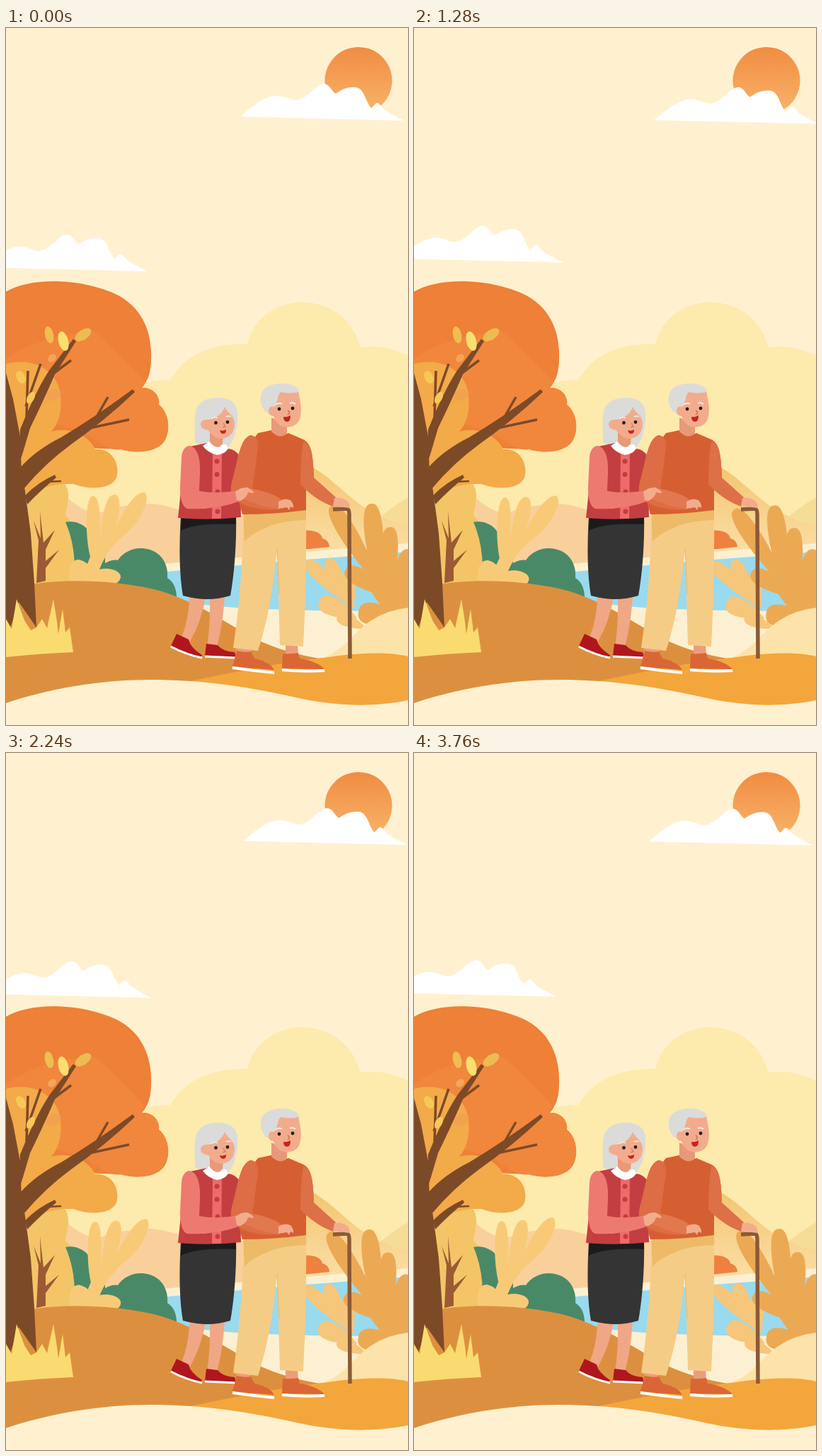
These frames come from a looping animation (568x986 px, 3840 ms). An HTML page:

```html
<!DOCTYPE html>
<html lang="en">
<head>
<meta charset="utf-8">
<title>Autumn walk</title>
<style>
html, body { margin: 0; width: 100%; height: 100%; overflow: hidden; background: #fff1d0; }
svg { display: block; width: 100vw; height: 100vh; }
</style>
</head>
<body>
<svg viewBox="0 0 568 986" preserveAspectRatio="none">
  <defs>
    <linearGradient id="sunFill" x2="0" y2="1">
      <stop offset="0" stop-color="#f18c43"/><stop offset="1" stop-color="#f7b56a"/>
    </linearGradient>
    <linearGradient id="ridge" x2="0" y2="1">
      <stop offset="0" stop-color="#f4c26c"/><stop offset="1" stop-color="#fbdfa6"/>
    </linearGradient>
    <path id="cloud" fill="#fff" d="M330.500 125.500C347 112 364 97 380 96C394 95 401 103 411 102C428 99 437 79 450 79C458 80 460 90 466 93C475 86 485 83 494 84C507 85 508 106 516 113C519 112 521 106 525 106C530 108 531 114 540 119Q550 125 563 131Z"/>
  </defs>

  <rect width="568" height="986" fill="#fff1d0"/>
  <circle cx="498" cy="74.500" r="47.500" fill="url(#sunFill)"/>
  <use href="#cloud" id="cloudA"/>
  <use href="#cloud" id="cloudB"/>

  <!-- distant bushes and hills -->
  <path fill="#fdeaad" d="M30 720V540H150C165 510 195 497 232 498C252 464 285 446 341 447C350 410 382 388 418 388C458 388 490 412 501 452C525 448 548 454 568 463V740H30Z"/>
  <path fill="#f5dd97" d="M515 704Q540 680 568 664V735H515Z"/>
  <path fill="#f9d09c" d="M80 658Q100 680 128 687Q165 673 205 673Q235 675 262 690L420 690V770H80Z"/>
  <path fill="url(#ridge)" d="M415 608L436 623C465 640 490 672 520 686Q545 700 568 704V745H400Z"/>
  <path fill="#ee8140" d="M400 740V720C415 712 424 709 430 711C440 712 446 716 447 722Q456 724 457 734Z"/>
  <path fill="#fdf0d2" d="M220 758L424 741L568 729V900H220Z"/>
  <path fill="#99daee" d="M215 770L424 752L568 741V824Q470 826 368 822Q290 820 215 806Z"/>

  <g id="sprig" fill="#f6c67a"></g>
  <g id="fern" fill="#eca954"></g>
  <path fill="#fce3a9" d="M452 889C480 878 493 852 518 837Q540 823 568 820V900H452Z"/>

  <!-- left side greenery -->
  <path fill="#f3c566" d="M30 655Q62 640 84 646C92 660 86 675 84 690C98 700 104 730 97 790H30Z"/>
  <g fill="#4a8968">
    <path d="M84 699C98 696 112 703 118 713Q120 722 122 725L140 742V795H95Q102 740 84 699Z"/>
    <path d="M120 790C122 765 145 750 158 753C165 742 178 736 190 736C212 736 230 751 228 778C238 784 242 796 241 812H120Z"/>
  </g>
  <path id="bush" fill="#f8ca78" d="M92 792C86 765 91 752 103 752Q111 754 115 758L119 748C111 715 112 662 123 662C134 662 133 700 133 724C135 700 139 660 153 660C166 660 160 700 149 721C160 692 182 653 196 657C205 664 192 697 169 716C150 730 138 750 132 766C146 762 162 768 162 776C161 787 148 790 135 790Z"/>

  <!-- ground -->
  <path fill="#dc903f" d="M0 796Q20 788 42 786C90 779 155 782 205 793C265 807 310 842 352 864Q395 885 450 893V940L260 960H0Z"/>
  <path fill="#f3a63c" d="M250 926C320 912 390 897 455 890C500 884 540 882 568 889V965H250Z"/>
  <path fill="#fff1d0" d="M0 955C60 935 130 922 205 922C285 922 350 934 405 946C465 960 520 961 568 951V986H0Z"/>

  <!-- tree -->
  <path fill="#ee8037" d="M0 373C33 354 95 353 147 373C187 388 207 424 205 468C205 488 200 500 192 509C205 508 218 518 216 533C228 542 233 563 226 580C218 600 186 603 162 596L0 590Z"/>
  <path fill="#f0873c" d="M0 468C40 440 85 435 122 428C140 440 175 475 197 501L192 509C205 508 218 518 216 533C228 542 233 563 226 580C218 600 186 603 162 596C145 600 125 580 105 570L0 540Z"/>
  <path fill="#f3aa49" d="M0 475C35 466 64 481 74 506C81 530 78 555 64 571C90 563 118 577 126 596C148 594 162 615 156 636C150 651 122 655 95 645Q60 644 40 657L0 664Z"/>
  <path fill="#9b5a35" d="M43 785L46 725L39 697L49 722L48 684L53 728L69 710L56 738L56 754L75 738L56 764V782Z"/>
  <g fill="#7d4a27">
    <path d="M0 488L10 525L20 578L22 630L27 655L35 715L40 785L43 848L18 812L5 852L0 845Z"/>
    <path d="M18 618L20 568Q42 513 62 483L95 440L99 443L69 490Q54 525 34 566L24 600Z"/>
    <path d="M20 622Q42 597 78 579Q125 551 179 511L182 515Q140 555 92 589Q55 616 25 652Z"/>
    <path d="M27 661Q45 643 69 632L71 636Q49 654 30 674Z"/>
  </g>
  <g fill="none" stroke="#7d4a27" stroke-width="3.500">
    <path d="M68 488L92 470M128 550L144 522M118 566L174 554M29 550L31 485M28 535L49 475"/>
    <path stroke-width="2.500" d="M58 642L78 641"/>
  </g>
  <g id="leaves"></g>
  <path fill="#fadb70" d="M0 890V836L8 850L15 808L26 838L35 852L43 848L51 836L58 849L67 808L72 840L74 857L80 822L84 855L90 848L95 883Q45 885 0 890Z"/>

  <!-- woman -->
  <g>
    <path fill="#f0a785" d="M259 803L282 806Q275 842 260 868L248 862Q259 835 259 803ZM288 806H309Q306 845 298 876H284Q289 840 288 806Z"/>
    <path fill="#b0161d" d="M241 857L258 865Q260 876 277 887L276 890Q252 886 233 874ZM283 871L299 873Q306 882 323 883L325 890L281 888Z"/>
    <path fill="none" stroke="#fff" stroke-width="3" d="M233 875Q253 886 277 891M281 889L325 891"/>
    <path fill="#343434" d="M247 690H325C326 725 323 770 317 803Q285 813 250 803C244 770 245 725 247 690Z"/>
    <path fill="#1c1b1c" d="M248 690H325V702C290 701 265 702 247 711Z"/>
    <path fill="#dbdbda" d="M267 586C267 570 266 553 268 543C271 529 284 523 299 523C315 523 325 529 327 543C328 560 325 580 314 593H280Z"/>
    <path fill="#c33e40" d="M260 592L284 587L313 595Q325 596 330 606L332 692Q290 697 243 693L247 655Z"/>
    <path fill="#ef6a68" d="M292 600H305L304 694H291Z"/>
    <g fill="#c33e40"><circle cx="298" cy="613" r="3.500"/><circle cx="298" cy="631.500" r="3.500"/><circle cx="299" cy="656" r="3.500"/><circle cx="299" cy="684" r="3.500"/></g>
    <path fill="#fff" d="M278 591L289 584Q300 591 311 589L314 595Q309 603 298 604Q285 601 278 591Z"/>
    <path fill="#e99878" d="M288 570L307 576L306 588Q299 599 288 586Z"/>
    <path fill="#f2ac8c" d="M286 554C297 552 306 546 309 536C313 545 323 548 323 560C323 575 313 581 303 581C294 580 288 573 286 569Q275 568 275 560Q276 553 286 554Z"/>
    <path fill="none" stroke="#eee" stroke-width="1.500" d="M290 553Q295 549 299 552M311 550Q315 548 318 550"/>
    <g fill="#29201e"><circle cx="296.500" cy="558.500" r="2.400"/><circle cx="313" cy="557.500" r="2.400"/></g>
    <path fill="none" stroke="#d9805f" stroke-width="1.500" d="M307 559L310 564L306 565"/>
    <path fill="#c9231f" d="M302 569Q306 571 311 568Q311 574 307 574Q303 574 302 569Z"/>
  </g>

  <!-- man -->
  <g>
    <path fill="#eb9d7b" d="M325 874H347L346 886H326ZM395 872H412L413 888H395Z"/>
    <path fill="#da6635" d="M326 881Q337 884 346 882L351 892Q372 896 379 908L320 903ZM391 885Q402 886 413 884L415 892Q440 896 450 907L390 906Z"/>
    <path fill="none" stroke="#fff" stroke-width="4" d="M320 905Q348 909 379 912M390 908Q420 911 450 909"/>
    <path fill="#f5cc85" d="M336 680H424Q425 780 420 875L387 873L383 735Q376 820 356 881L321 877Q335 780 336 680Z"/>
    <path fill="#edba68" d="M335 680H424V696Q385 697 365 708Q348 715 337 726Z"/>
    <path fill="none" stroke="#e8b768" d="M383 736L386 800"/>
    <path fill="#d65f32" d="M356 573L375 569Q386 580 399 573L420 582C432 588 434 604 435 638L424 645L424 682Q380 688 334 688L326 660C335 620 342 590 356 573Z"/>
    <path fill="#dd7047" d="M420 584C432 588 434 606 435 636L466 664L463 677Q440 670 416 646Q416 610 420 584Z"/>
    <path fill="#dd6d44" d="M345 576C357 576 358 590 354 608L348 652Q373 655 389 667L386 681Q345 684 322 666Q314 656 321 635C329 604 331 582 345 576Z"/>
    <path fill="#e2784f" d="M347 652Q372 656 389 667L386 681Q354 676 334 665Z"/>
    <path fill="#f2ac8c" d="M385 670Q394 664 402 668Q407 674 406 679L402 677L400 682L397 678L385 680Z"/>
    <path fill="#e89977" d="M375 551L397 563V573Q388 583 375 571Z"/>
    <path fill="#dbdbda" d="M360 529C358 511 370 503 390 503C405 503 414 508 415 518Q401 524 391 520Q386 537 380 546Q364 548 360 529Z"/>
    <path fill="#f2ac8c" d="M379 536C385 529 383 517 389 515Q402 518 413 515C417 530 419 548 413 557C405 569 382 567 378 549Q371 549 371 541Q372 534 379 536Z"/>
    <path fill="none" stroke="#eee" stroke-width="1.800" d="M381 533Q385 529 390 532M401 531Q405 529 409 532"/>
    <g fill="#29201e"><circle cx="386" cy="539" r="2.400"/><circle cx="405" cy="538" r="2.400"/></g>
    <path fill="none" stroke="#cf7352" stroke-width="1.600" d="M398 541Q403 544 398 547"/>
    <path fill="#c9231f" d="M392 550Q397 551 402 548Q402 557 397 557Q392 557 392 550Z"/>
  </g>

  <!-- near arm, hands and cane -->
  <path fill="#ed7a70" d="M258 591C270 592 275 607 274 630L273 655Q300 660 327 654L331 669Q298 682 256 680Q246 676 246 650L248 607Q249 594 258 591Z"/>
  <path fill="#f2ac8c" d="M324 656Q332 649 341 650Q350 654 350 658L342 657Q340 665 331 669L326 668Z"/>
  <path fill="none" stroke="#8b5a36" stroke-width="5.500" stroke-linejoin="round" d="M462 681L482 680Q485 681 485 688L486 892"/>
  <path fill="#f2ac8c" d="M464 665Q475 663 482 669Q487 674 485 679L470 677L462 676Z"/>
</svg>
<script>
const LOOP = 3840, STEP = 80, LEG = 960;
const el = id => document.getElementById(id);

function add(parent, tag, attrs) {
  const node = document.createElementNS('http://www.w3.org/2000/svg', tag);
  for (const k in attrs) node.setAttribute(k, attrs[k]);
  el(parent).appendChild(node);
}

// Rounded blade running from base b to tip t, w wide
function blade(parent, bx, by, tx, ty, w) {
  const dx = tx - bx, dy = ty - by, len = Math.hypot(dx, dy);
  const nx = -dy / len * w * 0.8, ny = dx / len * w * 0.8;
  const at = (f, s) => `${bx + dx * f + nx * s} ${by + dy * f + ny * s}`;
  add(parent, 'path', {
    d: `M${bx} ${by}C${at(0.4, 0.6)} ${at(1.02, 1)} ${tx} ${ty}C${at(1.02, -1)} ${at(0.4, -0.6)} ${bx} ${by}Z`
  });
}

[[495, 822, 424, 754, 21], [486, 822, 455, 751, 21], [496, 835, 443, 810, 27],
 [490, 820, 478, 772, 24], [510, 850, 468, 832, 18]].forEach(b => blade('sprig', ...b));
[[535, 800, 460, 676, 26], [528, 810, 516, 673, 27], [538, 820, 543, 706, 25],
 [545, 815, 571, 738, 26], [555, 808, 480, 766, 26], [568, 836, 498, 826, 32],
 [565, 850, 524, 755, 50], [575, 840, 556, 770, 44]].forEach(b => blade('fern', ...b));

[[61, 434, 6, 12, -12, '#efbd50'], [81, 443, 7, 14, -14, '#fadf70'],
 [109, 434, 13, 7, -35, '#edbb52'], [65, 467, 6.5, 5, -40, '#f3a55a'],
 [21, 494, 6, 9.5, -28, '#f6c957'], [35, 523, 5, 9, 28, '#f6c957'],
 [67, 519, 11, 7.5, -30, '#f2a24f']].forEach(([cx, cy, rx, ry, a, fill]) =>
  add('leaves', 'ellipse', { cx, cy, rx, ry, fill, transform: `rotate(${a} ${cx} ${cy})` }));

const move = (id, x, y) => el(id).setAttribute('transform', `translate(${x} ${y})`);
const turn = (id, a, x, y) => el(id).setAttribute('transform', `rotate(${a} ${x} ${y})`);

function draw(ms) {
  const t = Math.floor(ms % LOOP / STEP) * STEP;
  const first = t < LOOP / 2;
  const k = 1 - Math.abs(t % (2 * LEG) / LEG - 1);
  move('cloudA', 13.3 * k, (first ? 7 : -2.7) * k);
  move('cloudB', -363 + (first ? 16.5 : 19.5) * k, 213.3 + (first ? -19 : 6.3) * k);
  turn('bush', 3.6 * k, 80, 790);
  turn('fern', -3.9 * k, 570, 840);
  turn('sprig', -3 * k, 505, 850);
}

const start = performance.now();
function tick() {
  draw(performance.now() - start);
  requestAnimationFrame(tick);
}
draw(0);
requestAnimationFrame(tick);
</script>
</body>
</html>
```
